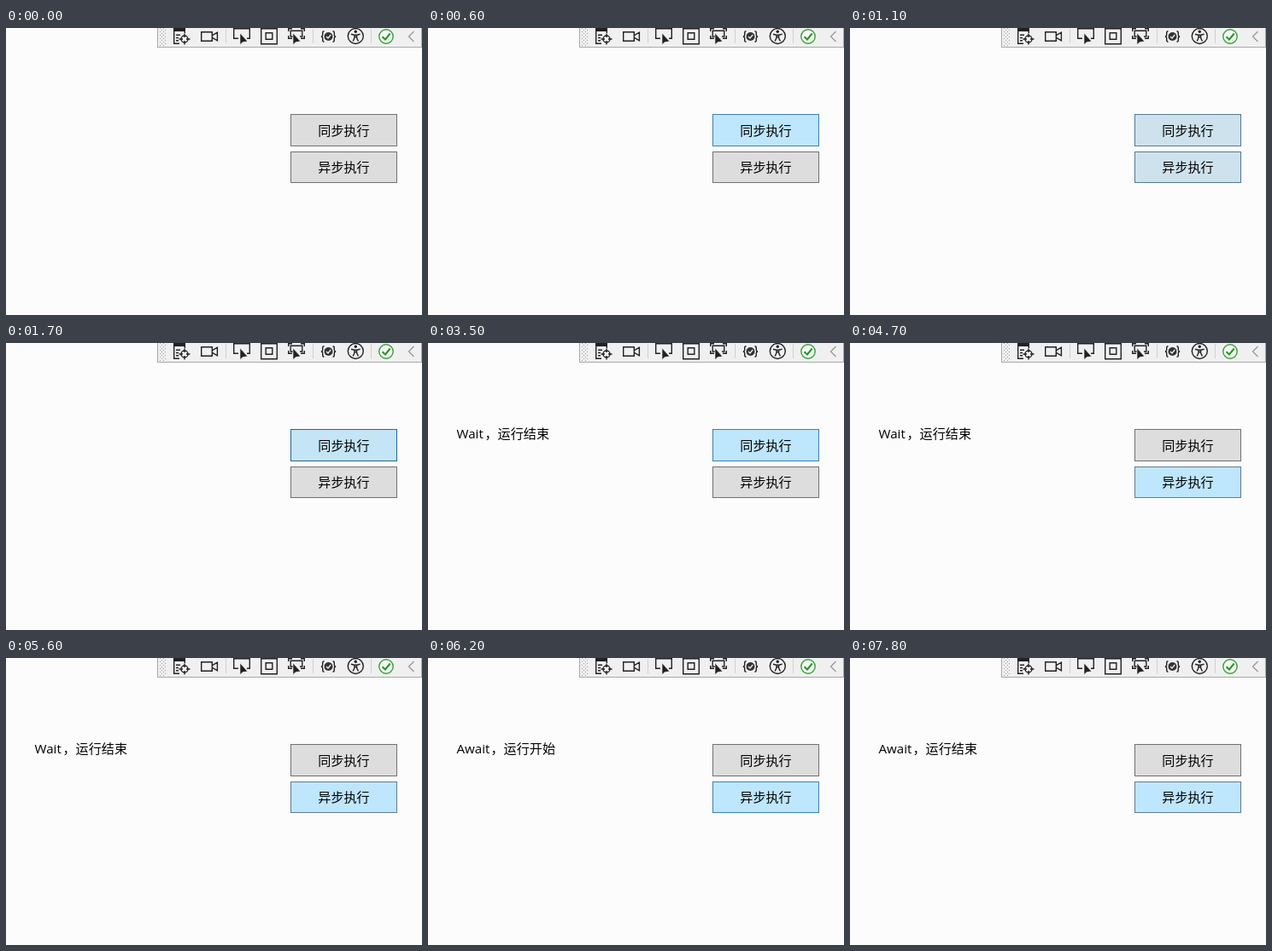
Recreate the animation shown at these times as an HTML page. Size 487x337 px, loop 8000 ms.

```html
<!DOCTYPE html>
<html lang="zh-CN">
<head>
<meta charset="utf-8">
<title>同步与异步</title>
<style>
  html, body { margin: 0; width: 100%; height: 100%; overflow: hidden; background: #fcfcfc; }
  svg { display: block; }
  text { font: 15.1px "Noto Sans CJK SC", "Noto Sans CJK", sans-serif; fill: #000; }
  .latin { font-family: "Open Sans", "Noto Sans", sans-serif; }
  .line { fill: none; stroke: #212121; stroke-width: 1.4; }
  .thin { fill: none; stroke: #d0d0d4; }
</style>
</head>
<body>
<svg width="487" height="337" viewBox="0 0 487 337">
  <defs>
    <pattern id="grip" x="180" y="0" width="4" height="4" patternUnits="userSpaceOnUse">
      <path d="M0 0h1v1h-1zM2 2h1v1h-1z" fill="#999"/>
    </pattern>
    <path id="pointer" d="M0 0V13.5L3.3 10.6L8.8 9.8Z" fill="#212121" stroke="#f0f0f0" stroke-width=".6"/>
  </defs>
  <rect width="487" height="337" fill="#fcfcfc"/>

  <g id="toolbar">
    <rect x="177.5" y="-2.5" width="309" height="25" fill="#f0f0f0" stroke="#a8a8a8"/>
    <rect x="180" y="0" width="8" height="21" fill="url(#grip)"/>
    <rect id="hot" y="-1" width="30" height="22" fill="#c9def5"/>
    <path class="thin" d="M257.5 1V18M359.5 1V18M427.5 1V18"/>

    <path d="M196 0h14v4h-14z" fill="#212121"/>
    <path class="line" d="M196.7 3V18.3H203M209.3 3V6M199 8.3H204M199 11.5H202M199 14.7H202"/>
    <circle class="line" cx="209" cy="13" r="4"/>
    <path class="line" d="M209 6.5V11M209 15V19.5M202.5 13H207M211 13H215.5"/>

    <path class="line" d="M228.7 4.7H241.3V15.3H228.7ZM241.5 8.7L247.4 5.2V14.8L241.5 11.3"/>

    <path class="line" d="M272 12.3H266.7V.7H285.3V12.3H282"/>
    <use href="#pointer" x="274" y="6"/>

    <path class="line" d="M298.7 .7H317.3V18.8H298.7ZM304.2 5.7H311.8V13.3H304.2Z"/>

    <path class="line" d="M330.7 4V.7H335M345 .7H349.3V4M330.7 9V12.3H335M345 12.3H349.3V9M336 10H333.2V3.2H346.8V10H344"/>
    <use href="#pointer" x="336" y="6"/>

    <path class="line" stroke-width="1.2" d="M372.5 3.7Q370.7 3.7 370.7 5.8V8Q370.7 9.7 369 10Q370.7 10.3 370.7 12V14Q370.7 16.3 372.5 16.3M382.5 3.7Q384.3 3.7 384.3 5.8V8Q384.3 9.7 386 10Q384.3 10.3 384.3 12V14Q384.3 16.3 382.5 16.3"/>
    <circle cx="377.5" cy="10" r="5" fill="#333"/>
    <path d="M375 10L377 12L380.2 8" fill="none" stroke="#f0f0f0" stroke-width="1.3"/>

    <circle class="line" cx="409.3" cy="9.5" r="9"/>
    <circle cx="409.3" cy="4.3" r="1.7" fill="#212121"/>
    <path class="line" stroke-width="1.6" d="M404 7.3L408 8.3H410.6L414.6 7.3M408 8V11.5L406.2 15.5M410.6 8V11.5L412.4 15.5M408 10.5H410.6"/>

    <circle cx="445" cy="10" r="8.2" fill="#f4faf4" stroke="#38a038" stroke-width="1.4"/>
    <path d="M440.5 10.2L444 13.5L449.7 6.5" fill="none" stroke="#289428" stroke-width="2"/>
    <path d="M477.5 4L471.5 10L477.5 16" fill="none" stroke="#999" stroke-width="1.3"/>
  </g>

  <rect id="syncButton" x="333.5" y="101.5" width="124" height="37"/>
  <rect id="asyncButton" x="333.5" y="145.5" width="124" height="36"/>
  <g text-anchor="middle">
    <text x="395.5" y="126">同步执行</text>
    <text x="395.5" y="169">异步执行</text>
  </g>
  <text class="latin" id="word" x="33.5" y="112"></text>
  <text id="message" y="112"></text>
</svg>

<script>
const LOOP = 8000;
const el = id => document.getElementById(id);

const STYLES = {
  idle: ['#dddddd', '#707070'],
  fading: ['#cee2ed', '#567891'],
  hover: ['#bee6fd', '#3c7fb1'],
  resting: ['#bee6fd', '#617b8c'],
  pressed: ['#c4e5f6', '#2c628b']
};

// [start, sync button, async button]
const BUTTONS = [
  [0, 'idle', 'idle'],
  [500, 'fading', 'idle'],
  [600, 'hover', 'idle'],
  [700, 'fading', 'fading'],
  [800, 'idle', 'resting'],
  [1100, 'fading', 'fading'],
  [1200, 'hover', 'idle'],
  [1700, 'pressed', 'idle'],
  [3500, 'hover', 'idle'],
  [3700, 'idle', 'resting'],
  [4100, 'hover', 'idle'],
  [4700, 'idle', 'resting'],
  [5400, 'hover', 'idle'],
  [5600, 'idle', 'resting'],
  [5800, 'idle', 'pressed'],
  [6200, 'idle', 'hover'],
  [7800, 'idle', 'resting']
];

// [start, word, message, message x]
const MESSAGES = [
  [0, '', '', 0],
  [3500, 'Wait', '，运行结束', 66.5],
  [6000, 'Await', '，运行开始', 73.5],
  [7800, 'Await', '，运行结束', 73.5]
];

// [start, left edge of the highlighted tool]
const TOOLS = [[0, null], [300, 223], [400, 430], [500, null]];

const at = (track, t) => track.findLast(step => step[0] <= t);

function paint(button, style) {
  const [fill, stroke] = STYLES[style];
  button.setAttribute('fill', fill);
  button.setAttribute('stroke', stroke);
}

function render(t) {
  const [, sync, async_] = at(BUTTONS, t);
  paint(el('syncButton'), sync);
  paint(el('asyncButton'), async_);

  const [, word, message, x] = at(MESSAGES, t);
  el('word').textContent = word;
  el('message').textContent = message;
  el('message').setAttribute('x', x);

  const [, left] = at(TOOLS, t);
  el('hot').setAttribute('x', left ?? 0);
  el('hot').setAttribute('visibility', left === null ? 'hidden' : 'visible');
}

const origin = performance.now();
function tick() {
  render((performance.now() - origin) % LOOP);
  requestAnimationFrame(tick);
}
tick();
</script>
</body>
</html>
```
